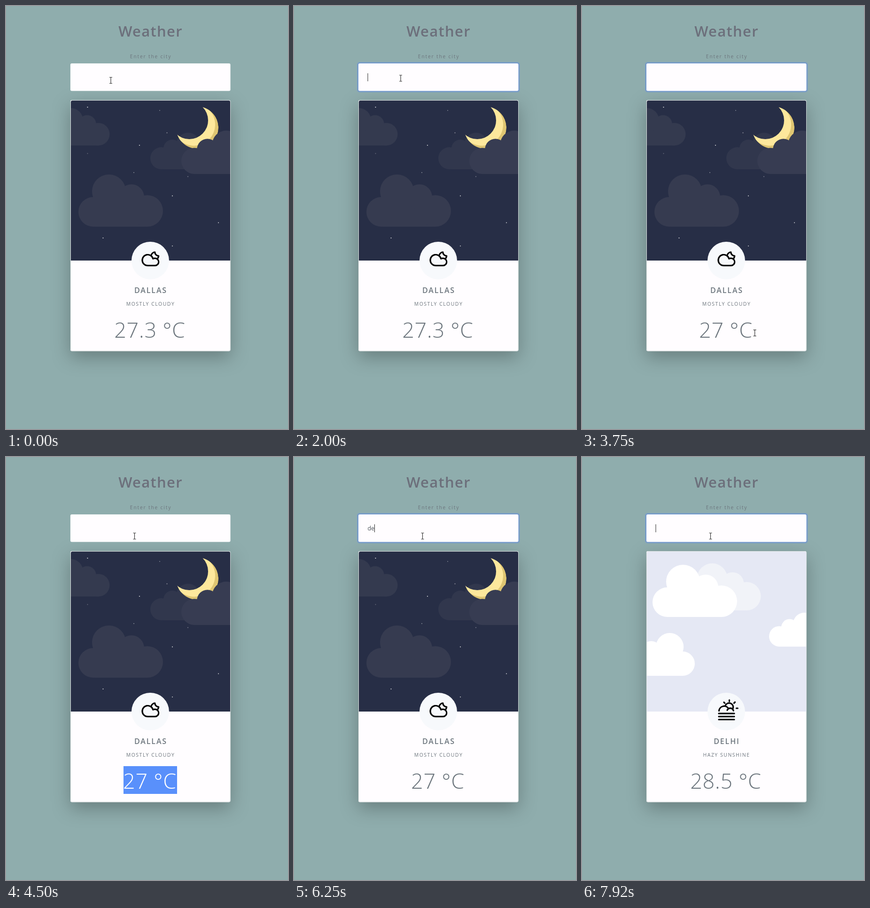
An HTML page that plays this animation: 600 px wide and 899 px high, repeating every 8000 ms.

```html
<!DOCTYPE html>
<html lang="en">
<head>
<meta charset="utf-8">
<title>Weather</title>
<style>
  html, body { margin: 0; width: 100%; height: 100%; overflow: hidden; background: #8fadad; }
  svg { display: block; }
  text { font-family: "Open Sans", "Noto Sans", sans-serif; fill: #6c757d; white-space: pre; }
  .mid { text-anchor: middle; }
  #title { font-size: 31px; font-weight: 600; letter-spacing: 1.3px; fill: #6c6f7b; }
  #label { font-size: 10.3px; letter-spacing: 1.8px; }
  #city { font-size: 16px; font-weight: 600; letter-spacing: 1.9px; }
  #sky { font-size: 10.5px; letter-spacing: 1.5px; }
  .temp { font-size: 45px; font-weight: 300; letter-spacing: .7px; }
  #marked .temp { fill: #fff; }
  #typed { font-size: 12.3px; fill: #495057; }
  #typed.preview { font: 10.7px "Liberation Sans", Arial, sans-serif; fill: #111827; }
  #menu text { font-size: 10.3px; fill: #16181c; }
  #card { filter: drop-shadow(0 13px 19px rgba(0, 0, 0, .27)); }
  #menu > rect:first-child { filter: drop-shadow(0 1px 1.5px rgba(0, 0, 0, .35)); }
  .line { fill: none; stroke: #000; stroke-width: 3.2; stroke-linecap: round; stroke-linejoin: round; }
</style>
</head>
<body>
<svg width="600" height="899" viewBox="0 0 600 899">
  <defs>
    <!-- Origin at the bottom right corner of the cloud -->
    <g id="cloud">
      <rect x="-148" y="-64" width="115" height="64"/>
      <circle cx="-148.5" cy="-31.5" r="31.5"/>
      <circle cx="-33.5" cy="-33.5" r="33.5"/>
      <circle cx="-115" cy="-75" r="36"/>
      <circle cx="-67" cy="-63" r="27"/>
    </g>
    <clipPath id="frame"><path d="M138 541V204q0-3 3-3H474q3 0 3 3V541z"/></clipPath>
    <clipPath id="disc"><circle cx="407" cy="258.5" r="45"/></clipPath>
    <mask id="crescent">
      <rect x="350" y="205" width="110" height="110" fill="#fff"/>
      <circle cx="390" cy="243" r="40" fill="#000"/>
    </mask>
    <clipPath id="drag"><rect id="dragBox" x="250" y="657" width="114" height="59"/></clipPath>
  </defs>

  <rect width="600" height="899" fill="#8fadad"/>
  <text id="title" class="mid" x="307.5" y="65">Weather</text>
  <text id="label" class="mid" x="308" y="110.5">Enter the city</text>

  <rect id="card" x="137" y="200" width="340.5" height="533.5" rx="3" fill="#fffdff"/>
  <rect x="137.5" y="200.5" width="339.5" height="532.5" rx="3" fill="none" stroke="#dfe3e3"/>

  <g clip-path="url(#frame)">
    <g id="night">
      <rect x="137" y="200" width="341" height="341" fill="#272e46"/>
      <g id="stars"></g>
      <use href="#cloud" transform="translate(334 469)" fill="#363b50"/>
      <use href="#cloud" transform="translate(220.5 296.5) scale(.716)" fill="#343a4f"/>
      <use href="#cloud" transform="translate(307 347) scale(-.7 .7)" fill="#31374d"/>
      <g clip-path="url(#disc)"><g mask="url(#crescent)">
        <circle cx="407" cy="258.5" r="45" fill="#dfc672"/>
        <circle cx="400" cy="252" r="45" fill="#fde89c"/>
      </g></g>
      <use href="#cloud" transform="translate(373 357) scale(-.83 .83)" fill="#373c52"/>
    </g>
    <g id="day" fill="#fff">
      <rect x="137" y="200" width="341" height="341" fill="#e5e8f4"/>
      <use href="#cloud" transform="translate(380.5 326) scale(.9)" fill="#f1f3f8"/>
      <use href="#cloud" transform="translate(330 340)"/>
      <g transform="translate(240 465) scale(.82)"><use href="#cloud" transform="translate(-180) scale(-1 1)"/></g>
      <use href="#cloud" transform="translate(398 403) scale(-.65 .65)"/>
    </g>
  </g>

  <circle cx="307" cy="541" r="40" fill="#f7f9fc"/>
  <g id="nightIcon" class="line">
    <path d="M301.5 551.7h15.5a7.8 7.8 0 0 0 0-15.6c-1.5 0-3 .3-4.2 1.1a11.6 11.6 0 1 0-11.3 14.5z"/>
    <path d="M309 529.5a9.5 9.5 0 0 1 7.7-6.5 8 8 0 0 0 8 8 9.5 9.5 0 0 1-3 6.5"/>
  </g>
  <g id="dayIcon" class="line">
    <path d="M291.5 539.5a11 11 0 0 1 20.5-4.5M309 538a7 7 0 0 1 13.2 1.2"/>
    <path d="M305 528.5a8.6 8.6 0 1 1 16.2 6"/>
    <path d="M313.5 516.5v2.8M302 521.3l1.8 1.8M325.5 521l-2 2M328.5 534h2.8"/>
    <path d="M291 545.2h33M291 551.6h33M291 558h33"/>
  </g>

  <text id="city" class="mid" x="308" y="609.7"></text>
  <text id="sky" class="mid" x="307.5" y="637.3"></text>
  <text class="temp mid" x="306" y="705"></text>
  <g id="marked" clip-path="url(#drag)">
    <rect x="250" y="657" width="114" height="59" fill="#5990fb"/>
    <text class="temp mid" x="306" y="705"></text>
  </g>

  <g id="glow">
    <rect x="135" y="120" width="344.5" height="62.5" rx="4" fill="none" stroke="#7399cf" stroke-opacity=".35" stroke-width="3"/>
    <rect x="136" y="121" width="342.5" height="60.5" rx="4" fill="#7097cc" stroke="#7097cc" stroke-width="2"/>
  </g>
  <rect id="field" x="137" y="122" width="340.5" height="58.5" rx="3"/>
  <text id="typed" x="156.5" y="156"></text>
  <rect id="caret" y="143" width="1" height="17" fill="#222"/>

  <g id="menu">
    <rect id="menuBox" x="137" y="182" width="340.5" rx="2" fill="#fffdff"/>
    <rect id="hover" x="137.5" width="339.5" height="28.5" fill="#e6e5e6"/>
    <g id="items"></g>
  </g>

  <path id="beam" d="M-3-6.5h2.2q.8 0 .8.8q0-.8.8-.8H3M0-6V6M-3 6.5h2.2q.8 0 .8-.8q0 .8.8.8H3" fill="none" stroke="#333" stroke-width="1.2"/>
  <path id="arrow" d="M.5.5v13.2l3-2.8 2.1 4.7 2.1-.9-2-4.6h4z" fill="#fff" stroke="#222"/>
</svg>
<script>
  const $ = id => document.getElementById(id);
  const show = (id, on) => $(id).style.display = on ? "" : "none";
  const set = (id, attrs) => { for (const k in attrs) $(id).setAttribute(k, attrs[k]); };
  const clamp = v => Math.max(0, Math.min(1, v));
  const within = (t, ...spans) => spans.some(([a, b]) => t >= a && t < b);

  const LOOP = 8000, FPS = 12, ROW = 28.8;
  const cities = ["dallas", "Lubbock", "LUBBOCK", "tokyo", "Chicago", "dallas\\"];
  const matches = cities.filter(c => c.startsWith("d"));

  // Tracks: [start in ms, value], held until the next entry
  const typing = [
    [0, ""], [750, "d"], [1170, "da"], [1330, "dal"], [1500, "dall"], [1580, "dalla"],
    [1670, "dallas"], [2000, ""], [2920, "dallas"], [3080, ""], [5830, "d"], [6170, "de"],
    [6420, "del"], [6580, "delh"], [6750, "delhi"], [7080, ""]
  ];
  const menus = [
    [0, []], [670, cities], [750, matches], [1670, []], [2920, matches], [3580, []],
    [4920, cities], [5830, matches], [6170, []]
  ];
  const temps = [[0, "27.3 °C"], [2080, "27 °C"], [7330, "28.5 °C"]];
  const mouse = [
    [0, 223, 158], [420, 225, 156], [500, 227, 153.5], [2830, 227, 153.5], [2920, 280, 205],
    [3000, 310, 241], [3080, 325, 330], [3250, 365, 520], [3420, 383, 680], [3580, 388, 718],
    [3750, 370, 695], [4000, 252, 690], [4330, 268, 260], [4500, 273.5, 168]
  ];

  const at = (track, t) => track.findLast(e => e[0] <= t)[1];

  function pointer(t) {
    const i = mouse.findLastIndex(e => e[0] <= t);
    const [t0, x0, y0] = mouse[i], [t1, x1, y1] = mouse[i + 1] || [LOOP, x0, y0];
    const k = (t - t0) / (t1 - t0);
    return [x0 + (x1 - x0) * k, y0 + (y1 - y0) * k];
  }

  // x, y, opacity
  $("stars").innerHTML = [
    [173.5, 215, .9], [327, 222, .4], [342.5, 269.5, .55], [284, 296, .85], [173.5, 313.5, .3],
    [272, 354, .45], [387, 362.5, .4], [354, 403.5, .85], [452, 460.5, .8], [206.5, 493, .85], [354, 510, .75]
  ].map(([x, y, o]) => `<circle cx="${x}" cy="${y}" r="1" fill="#fff" opacity="${o}"/>`).join("");

  let listed;
  function drawMenu(list, row) {
    show("menu", list.length);
    show("hover", row >= 0);
    set("hover", { y: 188 + ROW * Math.max(row, 0) });
    if (list === listed) return;
    listed = list;
    set("menuBox", { height: 12 + ROW * list.length });
    $("items").innerHTML = list.map((c, i) => `<text x="146.5" y="${206.3 + ROW * i}">${c}</text>`).join("");
  }

  function draw(ms) {
    const t = Math.floor(ms * FPS / 1000) * 1000 / FPS + 5;
    const preview = within(t, [2920, 3080]);
    const text = at(typing, t);

    $("typed").textContent = text;
    $("typed").setAttribute("class", preview ? "preview" : "");
    set("field", { fill: preview ? "#e8f0fe" : "#fffdff" });
    show("caret", within(t, [580, 2580], [2920, 3500], [4670, 5170], [5750, 7250], [7830, LOOP + 9]));
    set("caret", { x: 156.5 + (text && !preview ? $("typed").getComputedTextLength() : 0) });

    const focus = t < 4600 ? clamp((t - 420) / 160) * clamp((3920 - t) / 170) : clamp((t - 4590) / 240);
    set("glow", { opacity: focus });
    drawMenu(at(menus, t), preview ? (t < 3000 ? 0 : 1) : -1);

    document.querySelectorAll(".temp").forEach(e => e.textContent = at(temps, t));
    const delhi = t >= 7330, sunny = t >= 7830;
    $("city").textContent = delhi ? "DELHI" : "DALLAS";
    $("sky").textContent = delhi ? "HAZY SUNSHINE" : "MOSTLY CLOUDY";
    show("day", sunny);
    show("dayIcon", sunny);
    show("night", !sunny);
    show("nightIcon", !sunny);

    const [x, y] = pointer(t);
    const left = t < 4000 ? Math.max(250, Math.min(364, x)) : 250;
    show("marked", within(t, [3750, 4670]));
    set("dragBox", { x: left, width: 364 - left });

    const onText = y < 181 || (y > 657 && y < 716 && x > 235 && x < 378);
    show("beam", onText);
    show("arrow", !onText);
    set(onText ? "beam" : "arrow", { transform: `translate(${x} ${y})` });
  }

  function tick() {
    draw(performance.now() % LOOP);
    requestAnimationFrame(tick);
  }
  tick();
</script>
</body>
</html>
```
